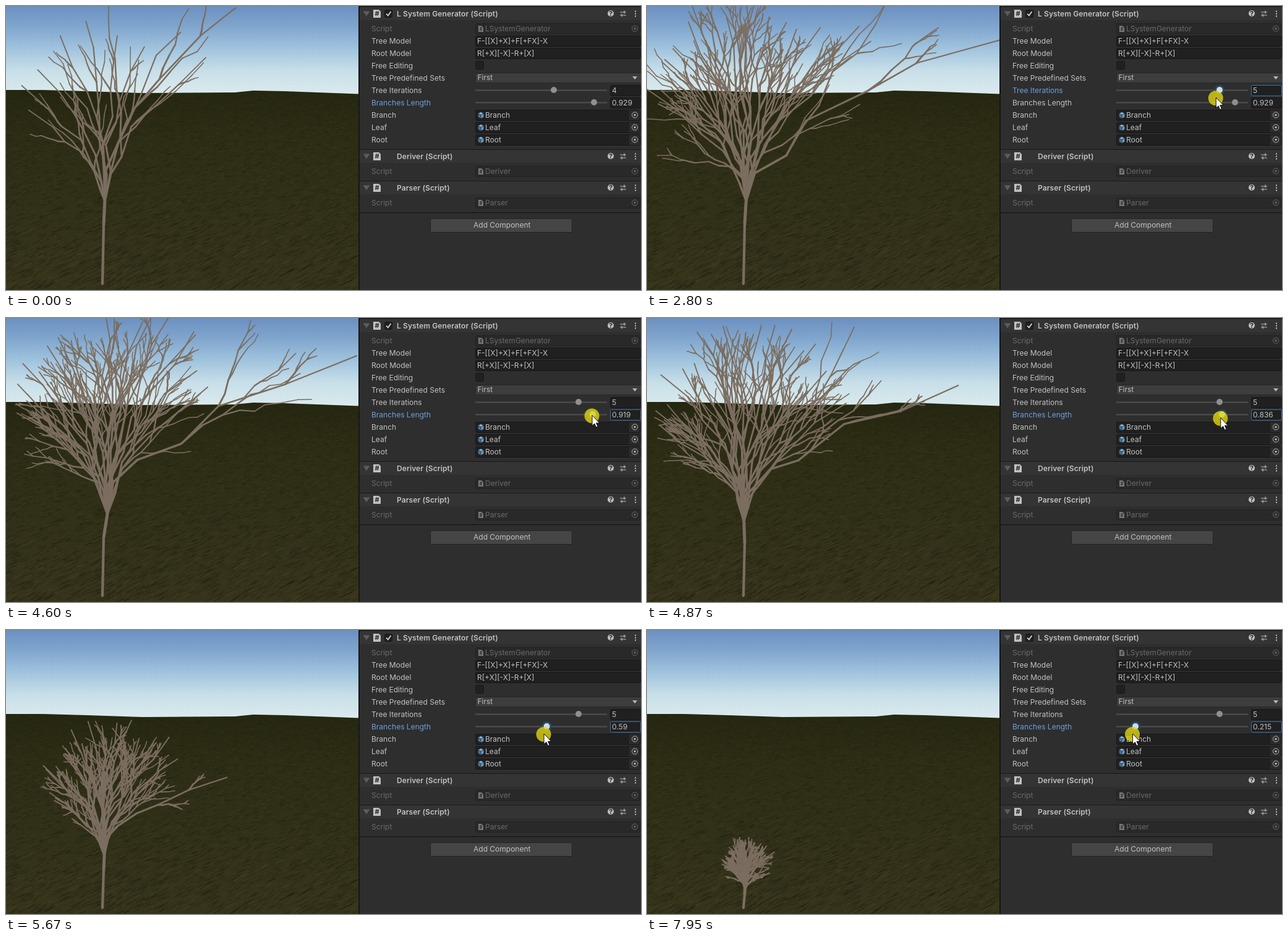
An HTML page with a canvas that plays this animation: 1027 px wide and 460 px high, repeating every 8000 ms.

```html
<!DOCTYPE html>
<html lang="en">
<head>
<meta charset="utf-8">
<title>L-system tree inspector</title>
<style>
html, body { margin: 0; width: 1027px; height: 460px; overflow: hidden; background: #2e2e2e; }
canvas, svg { position: absolute; left: 0; top: 0; }
text { font: 12px Inter, Roboto, sans-serif; fill: #c2c2c2; }
.bold { font-weight: 600; letter-spacing: .1px; }
.dim { fill: #6a6a6a; }
.blue { fill: #6c9fdc; }
.mark { font-weight: 700; font-size: 11px; fill: #2b2b2b; text-anchor: middle; }
.tiny { font-size: 7px; }
.field { fill: #202020; stroke: #171717; }
.field.on { stroke: #3a6ea8; }
.halo { fill: #24486a; opacity: 0; }
.knob { fill: #8f8f8f; }
.on > .halo { opacity: 1; }
.on > .knob { fill: #d3dbe2; }
</style>
</head>
<body>
<canvas id="land" width="571" height="460"></canvas>
<canvas id="tree" width="571" height="460"></canvas>
<svg id="ui" width="1027" height="460"></svg>
<script>
const LOOP = 8000, STEP = 200 / 3;
const FULL = .929;
const $ = id => document.getElementById(id);
const lerp = (a, b, f) => a + (b - a) * f;
const clamp = f => Math.max(0, Math.min(1, f));

function random(seed) {
  return () => {
    seed = (seed + 0x6D2B79F5) | 0;
    let t = Math.imul(seed ^ (seed >>> 15), 1 | seed);
    t = (t + Math.imul(t ^ (t >>> 7), 61 | t)) ^ t;
    return ((t ^ (t >>> 14)) >>> 0) / 4294967296;
  };
}

// Value of a list of [time, ...values] keys at time t
function at(keys, t) {
  const i = keys.findIndex(k => k[0] > t);
  if (i < 0) return keys[keys.length - 1].slice(1);
  if (i === 0) return keys[0].slice(1);
  const a = keys[i - 1], b = keys[i], f = (t - a[0]) / (b[0] - a[0]);
  return a.slice(1).map((v, k) => lerp(v, b[k + 1], f));
}

// ---------- landscape ----------
function drawLand() {
  const c = $('land').getContext('2d'), rnd = random(7);
  const sky = c.createLinearGradient(0, 0, 0, 140);
  ['#6b90c0', '#81a7ce', '#a1c4de', '#c8dfe9', '#d9eaed'].forEach((s, i) => sky.addColorStop(i / 4, s));
  c.fillStyle = sky;
  c.fillRect(0, 0, 571, 150);
  const hill = new Path2D('M0 136 60 136 130 138 220 141 370 140 400 137 450 138 571 142.500V460H0Z');
  const grass = c.createLinearGradient(0, 136, 0, 460);
  grass.addColorStop(0, '#262711');
  grass.addColorStop(.25, '#2d2d15');
  grass.addColorStop(1, '#35331b');
  c.fillStyle = grass;
  c.fill(hill);
  c.clip(hill);
  for (let i = 0; i < 8000; i++) {
    const d = rnd() ** 1.2, x = rnd() * 590 - 10, y = 139 + d * 322;
    const len = (3 + 9 * d) * (.5 + rnd());
    c.strokeStyle = rnd() < .5 ? 'rgba(88,82,46,.14)' : 'rgba(8,10,2,.15)';
    c.lineWidth = .8 + d;
    c.beginPath();
    c.moveTo(x, y);
    c.lineTo(x + len, y - len * .42 * (.3 + d));
    c.stroke();
  }
}

// ---------- tree ----------
// Angles are measured from straight up, positive to the right.
const polar = ([x, y], angle, r) => [x + Math.sin(angle) * r, y - Math.cos(angle) * r];

function drawTree(n, v) {
  const c = $('tree').getContext('2d');
  const rnd = random(n * 1000 + Math.round(v * 1000));
  const vary = k => (rnd() - .5) * k;
  const scale = v / FULL, size = Math.sqrt((n - .5) / 4.5);

  c.clearRect(0, 0, 571, 460);
  c.strokeStyle = '#7b6d60';
  c.lineCap = 'round';

  function stroke(a, b, width) {
    c.lineWidth = width;
    c.beginPath();
    c.moveTo(...a);
    c.lineTo(...b);
    c.stroke();
  }

  // A kinked branch that rises before it spreads, with children along its outer part
  function branch(from, to, width, depth, power) {
    const reach = Math.hypot(to[0] - from[0], to[1] - from[1]), parts = 6;
    let last = from;
    for (let i = 1; i <= parts; i++) {
      const f = i / parts, kink = i < parts ? reach * .06 : 0;
      const p = [lerp(from[0], to[0], f ** power) + vary(kink), lerp(from[1], to[1], f) + vary(kink)];
      stroke(last, p, Math.max(1.5, width * (1 - .5 * f)));
      if (depth > 0 && i > 1 && i < parts && rnd() < .8) {
        const heading = Math.atan2(p[0] - last[0], last[1] - p[1]);
        const turn = (rnd() < .5 ? -1 : 1) * (.2 + .4 * rnd());
        const length = reach * (1 - f) * (.6 + .4 * rnd());
        branch(p, polar(p, heading + turn, length), width * .75, depth - 1, 1);
      }
      last = p;
    }
  }

  const base = [156, 450], root = [158 + (rnd() - .2) * 8 * scale, 450 - 134 * scale];
  const fork = [158, 450 - 96 * scale];
  stroke(base, fork, 4.2);
  stroke(fork, root, 5);

  const limbs = n < 5 ? 3 * n - 3 : 19;
  for (let i = 0; i < limbs; i++) {
    const angle = lerp(-.78, .72, ((i + .5) / limbs) ** 1.15) + vary(.08);
    const reach = (335 - (angle < 0 ? 210 : 70) * angle ** 2) * (.85 + .25 * rnd());
    branch(root, polar(root, angle, reach * size * scale), 3.8, n - 3, 1.8);
  }
  // The long bough on the right leans further out with each iteration
  const bough = polar(root, .41 * (n - 2.55), (108 * n - 54) * scale ** 1.6);
  branch(root, bough, 4.5, n - 3, 1.9);
}

// ---------- inspector ----------
const text = (x, y, s, cls = '', id = '') => `<text x="${x}" y="${y + 4.3}" class="${cls}" id="${id}">${s}</text>`;
const rect = (x, y, w, h, fill, extra = '') => `<rect x="${x}" y="${y}" width="${w}" height="${h}" fill="${fill}" ${extra}/>`;
const field = (x, y, w, id = '') => `<rect x="${x + .5}" y="${y - 8.5}" width="${w - 1}" height="17" rx="2" class="field" id="${id}"/>`;
const label = (y, s, cls, id) => text(591, y, s, cls, id);
const rule = y => rect(572, y, 455, 1.5, '#191919');

const sheet = (x, y, w, h, col) => `<path d="M${x} ${y}h${w - 3}l3 3v${h - 3}h${-w}z" fill="${col}"/>`;
const cube = y => `<g transform="translate(768 ${y}) scale(.9)"><path d="M0-5.5 4.8-3V3L0 5.5-4.8 3V-3Z" fill="#467299"/>
  <path d="M0-5.5 4.8-3 0-.6-4.8-3Z" fill="#86b3d4"/><path d="M0-.6V5.5L4.8 3V-3Z" fill="#6a9ac0"/>
  <path d="M-4.8-3 0-.6 4.8-3M0-.6V5.5" stroke="#26323c" fill="none"/></g>`;
const picker = (y, col) => `<circle cx="1017" cy="${y}" r="4.6" fill="none" stroke="${col}"/>
  <circle cx="1017" cy="${y}" r="1.7" fill="${col}"/>`;

function header(y, title) {
  return rect(572, y - 10.5, 455, 21, '#343434') +
    `<path d="M577.500 ${y - 4}h11l-5.500 8z" fill="#5c5c5c"/>` +
    sheet(594, y - 6.5, 12, 13, '#c0c3c3') + text(600, y - .5, '#', 'mark') +
    text(632, y, title, 'bold') +
    `<circle cx="978" cy="${y - .5}" r="5" fill="#c0c0c0"/>` + text(978, y - .5, '?', 'mark') +
    `<path d="M993 ${y - 2.5}h10M993 ${y + 2.5}h10M1000 ${y - 5}v5M996 ${y}v5" stroke="#bcbcbc" stroke-width="1.2"/>` +
    [-4, 0, 4].map(d => rect(1017, y + d - 1, 2, 2, '#c0c0c0')).join('');
}
function scriptRow(y, name) {
  return label(y, 'Script', 'dim') + rect(759.5, y - 8.5, 266, 17, '#292929', 'rx="2" stroke="#222"') +
    sheet(764, y - 5, 8, 10, '#777') + text(768, y - 1.5, '#', 'mark tiny') +
    text(775, y, name, 'dim') + picker(y - .5, '#666');
}
const textRow = (y, name, value) => label(y, name) + field(759, y, 268) + text(762, y, value);
const objectRow = (y, name) => label(y, name) + field(759, y, 267) + rect(1008, y - 8, 17, 16, '#2c2c2c') +
  cube(y) + text(775, y, name) + picker(y - .5, '#b4b4b4');
const slider = (y, name, id) => label(y, name, '', id + 'Label') + rect(759, y - 1.5, 213, 2, '#505050') +
  `<g id="${id}Knob"><circle class="halo" cy="${y - 1}" r="8"/><circle class="knob" cy="${y - 1}" r="5"/></g>` +
  field(977, y, 50, id + 'Field') + text(980, y, '', '', id + 'Value');

$('ui').innerHTML =
  rect(570, 0, 457, 460, '#2e2e2e') + rect(570, 0, 2, 460, '#171717') + rule(0) +
  header(12.5, 'L System Generator (Script)') +
  rect(612.5, 6.5, 12, 12, '#202020', 'rx="2" stroke="#151515"') +
  '<path d="M615 12.500 617.800 15.500 622.500 9" fill="none" stroke="#d6d6d6" stroke-width="1.800"/>' +
  scriptRow(37, 'LSystemGenerator') +
  textRow(57, 'Tree Model', 'F-[[X]+X]+F[+FX]-X') +
  textRow(77, 'Root Model', 'R[+X][-X]-R+[X]') +
  label(97, 'Free Editing') + rect(759.5, 89.5, 13, 13, '#202020', 'rx="2" stroke="#171717"') +
  label(117, 'Tree Predefined Sets') + rect(759.5, 108.5, 270, 16, '#3d3d3d', 'rx="2" stroke="#262626"') +
  text(762.5, 116, 'First') + '<path d="M1013 114h8l-4 5z" fill="#b8b8b8"/>' +
  slider(137, 'Tree Iterations', 'iter') + slider(157, 'Branches Length', 'len') +
  objectRow(177, 'Branch') + objectRow(197, 'Leaf') + objectRow(217, 'Root') +
  rule(232) + header(243.5, 'Deriver (Script)') + scriptRow(268, 'Deriver') +
  rule(283) + header(294.5, 'Parser (Script)') + scriptRow(319, 'Parser') + rule(334) +
  rect(686.5, 344.5, 229, 22, '#454545', 'rx="2" stroke="#232323"') + text(756, 355, 'Add Component') +
  `<g id="pointer"><circle r="12" fill="#e1d510" opacity=".8"/>
   <path d="M.5-1V16L4.300 12.500 7 18.500 9.600 17.300 7 11.500H12.300Z" fill="#fff" stroke="#111"/></g>`;

// ---------- motion ----------
const DRAG = 4566;
const POINTER = [
  [70, 1050, 475], [800, 886, 141], [930, 886, 141], [1600, 816, 146],
  [2550, 920, 149], [3730, 919, 150], [4200, 950, 158]
];
const LENGTH = [[DRAG, FULL], [6333, .384], [6880, .25], [7530, .25], [7900, .215]];
let drawn = '';

function setSlider(id, x, value, blue, active) {
  $(id + 'Knob').setAttribute('transform', `translate(${x} 0)`);
  $(id + 'Knob').classList.toggle('on', active);
  $(id + 'Field').classList.toggle('on', active);
  $(id + 'Label').classList.toggle('blue', blue);
  $(id + 'Value').textContent = value;
}

function frame(now) {
  const t = Math.floor((now % LOOP) / STEP + 1e-6) * STEP;
  const v = Math.round(at(LENGTH, t)[0] * 1000) / 1000;
  const lenX = 741.5 + 225.5 * v;
  let [x, y] = at(POINTER, t);
  const n = t < 930 ? 4 : Math.round((x - 726) / 40 > 5 ? 5 : (x - 726) / 40);
  if (t > DRAG) {
    const drift = clamp((t - DRAG) / 700);
    x = lenX - 1 - 4 * drift;
    y += 11 * drift;
  }
  const onIter = t >= 930 && t < 4250;
  setSlider('iter', 726 + 40 * n, n, onIter, onIter);
  setSlider('len', lenX, v, !onIter, t >= 4250);
  $('pointer').setAttribute('transform', `translate(${x} ${y})`);
  const key = n + '/' + v;
  if (key !== drawn) drawTree(n, v);
  drawn = key;
  requestAnimationFrame(frame);
}

drawLand();
frame(0);
</script>
</body>
</html>
```
